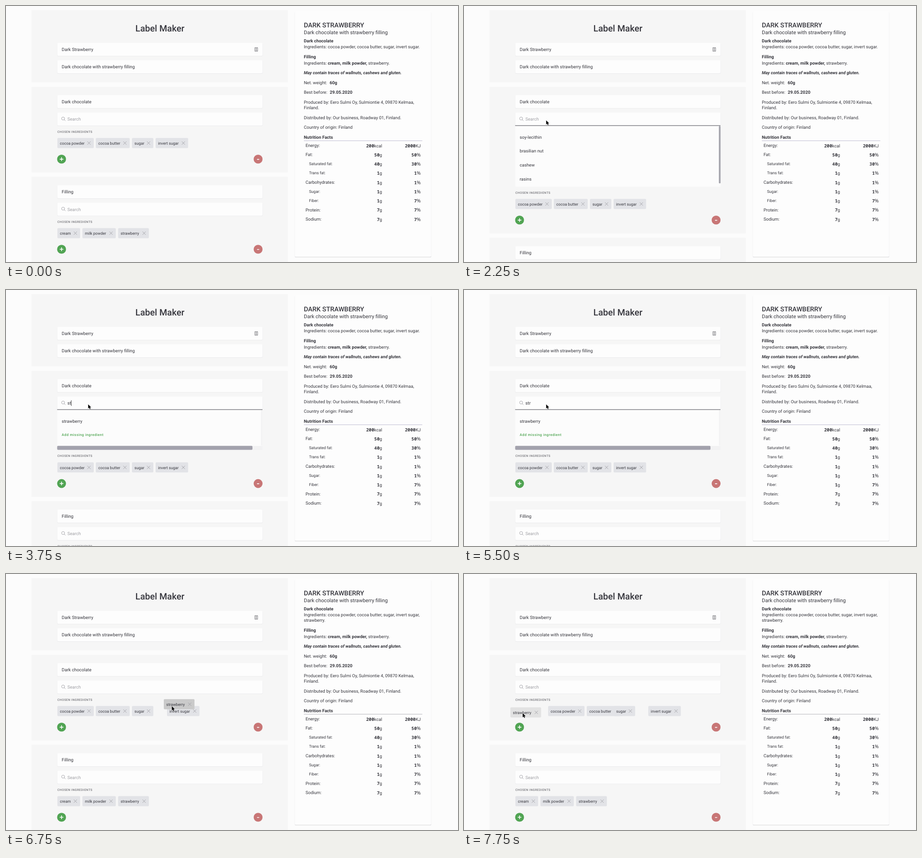
Animation, 994 px wide and 563 px high, one loop 8 s. Source, as an HTML page:

```html
<!DOCTYPE html>
<html lang="en">
<head>
<meta charset="utf-8">
<title>Label Maker</title>
<style>
  html, body { margin: 0; width: 100%; height: 100%; overflow: hidden; background: #fcfcfc; }
  svg { display: block; width: 100%; height: 100%; }
  text { font: 9.65px Roboto, sans-serif; fill: #36363d; text-rendering: geometricPrecision; }
  text.bold, .bold { font-weight: 600; }
  text.field { font-size: 9.8px; }
  text.chip { font-size: 8.6px; }
  text.hint { fill: #a0a0a5; }
  text.caps { font-size: 6.5px; font-weight: 500; letter-spacing: .52px; fill: #707075; }
  text.add { font-size: 7.8px; font-weight: 500; letter-spacing: .52px; fill: #4fa552; }
  text.title { font-size: 19.6px; font-weight: 500; text-anchor: middle; }
  text.product { font-size: 14.4px; font-weight: 500; }
  text.subtitle { font-size: 11.25px; }
  text.warning { font-size: 9.45px; font-weight: 600; font-style: italic; }
  text.sub { font-size: 8.6px; }
  text.value { text-anchor: end; }
  .digits { font: bold 9.8px "Noto Sans Mono", monospace; }
  .percent { font: 10.5px "Noto Sans", sans-serif; }
  .icon { fill: none; stroke: #9c9ca2; stroke-width: .9; }
</style>
</head>
<body>
<svg id="stage" viewBox="0 0 994 563"></svg>
<script>
const STEP = 250, LOOP = 8000;
const stage = document.getElementById('stage');

// Keys are [tick, ...values]
const POINTER = [[1, 820, 318], [2, 560, 1], [3, 395, 115], [4, 308, 240], [5, 162, 247],
  [6, 162, 247], [9, 180.7, 251.5], [24, 180.7, 251.5], [26, 423, 306], [29, 248, 260.5], [31, 129, 306]];
const DRAGGED = [[26, 405.5, 290.3], [29, 230, 245.3], [31, 102, 293.3]];
const CHOSEN = [
  { label: 'cocoa powder', x: 113, width: 80, shift: [[28, 0], [29, 52], [31, 72]] },
  { label: 'cocoa butter', x: 197.5, width: 74.5, shift: [[28, 0], [29, 52], [31, 72.5]] },
  { label: 'sugar', x: 277, width: 47, shift: [[27, 0], [29, 37.5], [31, 52.3]] },
  { label: 'invert sugar', x: 329, width: 71.5, shift: [[26, 0], [28, 50], [29, 55], [31, 76.3]] },
];
const NUTRITION = [
  ['Energy:', 200, 'kcal', 2000, 'KJ'], ['Fat:', 50, 'g', 50, '%'],
  ['Saturated fat:', 40, 'g', 30, '%', true], ['Trans fat:', 1, 'g', 1, '%', true],
  ['Carbohydrates:', 1, 'g', 1, '%'], ['Sugar:', 1, 'g', 1, '%', true],
  ['Fiber:', 1, 'g', 7, '%', true], ['Protein:', 7, 'g', 7, '%'], ['Sodium:', 7, 'g', 7, '%'],
];

function at(keys, tick) {
  const next = keys.findIndex(key => key[0] > tick);
  if (next < 0) return keys[keys.length - 1].slice(1);
  if (next === 0) return keys[0].slice(1);
  const a = keys[next - 1], b = keys[next], p = (tick - a[0]) / (b[0] - a[0]);
  return a.slice(1).map((v, i) => v + (b[i + 1] - v) * p);
}

const rect = (x, y, w, h, fill, r = 0) =>
  `<rect x="${x}" y="${y}" width="${w}" height="${h}" rx="${r}" fill="${fill}"/>`;
const text = (x, y, content, cls = '') => `<text x="${x}" y="${y}" class="${cls}">${content}</text>`;
const path = (d, attrs) => `<path d="${d}" ${attrs}/>`;
const group = (x, y, content) => `<g transform="translate(${x} ${y})">${content}</g>`;
const card = (y, h) => rect(56, y, 564, h, '#f6f6f6', 1);

const field = (y, content = '', cls = 'field') =>
  rect(112.5, y + .8, 452, 29, '#ebebed', 2) + rect(113, y, 451, 28.8, '#fdfdfd', 2) +
  text(122.5, y + 18, content, cls);

const searchField = (y, typed = '') => field(y) +
  `<circle class="icon" cx="125.6" cy="${y + 13.2}" r="3.3"/>` +
  path(`M128 ${y + 15.6}l2.8 2.8`, 'class="icon"') +
  text(135, y + 18, typed || 'Search', typed ? 'field' : 'hint');

const chip = (x, y, width, label, fill = '#e2e3e7') => group(x, y,
  rect(0, 0, width, 22.2, fill, 2) + text(5.5, 14.6, label, 'chip') +
  path(`M${width - 14} 7.6l7 7m0 -7l-7 7`, 'class="icon"'));

const buttons = y =>
  `<circle cx="122.2" cy="${y}" r="9.8" fill="#51a453"/><circle cx="554.4" cy="${y}" r="9.8" fill="#c87676"/>` +
  path(`M118.2 ${y}h8m-4 -4v8M552 ${y + .5}h4.8`, 'stroke="#fff" stroke-width="1.7"');

function dropdown(query) {
  const options = query.length > 1 ? ['strawberry'] : ['soy-lecithin', 'brasilian nut', 'cashew', 'rasins'];
  const short = options.length === 1;
  const bars = short
    ? rect(560.5, 264, 3.5, 78, '#f3f3f4') + rect(113, 342.8, 451, 9, '#f2f2f3') +
      rect(112.5, 342.8, 429.5, 8.8, '#a3a2ad', 2) + text(122.5, 321.2, 'Add missing ingredient', 'add')
    : rect(560.5, 264, 3.7, 126, '#a5a5ad', 1.5);
  return rect(113, 263, 451, short ? 80 : 134.5, '#fcfcfc') +
    options.map((name, i) => text(122.5, 291.7 + i * 30.6, name)).join('') +
    bars + rect(112.5, 262.3, 451.5, 1.4, '#77777c');
}

function firstComponent(tick, open, query, push) {
  const added = tick >= 24;
  let svg = card(178, 188.3 + push) + field(196, 'Dark chocolate') + searchField(234.3, query);
  if (open) {
    svg += dropdown(query);
    // Caret blinks every half second after focus
    if (tick >= 14 ? tick < 16 || tick % 4 < 2 : tick % 4 > 1)
      svg += rect([135, 140, 143, 146.2][query.length], 242.5, .9, 12.5, '#333');
  }
  svg += text(113, 278.5 + push, 'CHOSEN INGREDIENTS', 'caps');
  for (const { label, x, width, shift } of CHOSEN)
    svg += chip(x + at(shift, tick)[0], 290.3 + push, width, label);
  if (added) {
    const [x, y] = at(DRAGGED, tick);
    svg += chip(x, y, 67.5, 'strawberry', tick < 30 ? '#cacaca' : '#e2e2e2');
  }
  return svg + buttons(336.8 + push);
}

const secondComponent = push => group(0, push,
  card(375.5, 200) + field(394.2, 'Filling') + searchField(432.5) +
  text(113, 476.8, 'CHOSEN INGREDIENTS', 'caps') +
  chip(113, 488.5, 50, 'cream') + chip(168, 488.5, 73.5, 'milk powder') +
  chip(246.5, 488.5, 67.7, 'strawberry') + buttons(535));

const header = card(8.7, 159.3) + text(338.5, 56, 'Label Maker', 'title') +
  field(81, 'Dark Strawberry') + field(119.3, 'Dark chocolate with strawberry filling') +
  path('M547.3 91.5h6v8h-6zM549 93.5h2.6M550.3 93.5v4M549 97.5h2.6',
    'fill="none" stroke="#66666b" stroke-width=".9"');

const value = (x, y, number, unit) => text(x, y,
  `<tspan class="digits">${number}</tspan><tspan class="${unit === '%' ? 'percent' : ''}">${unit}</tspan>`, 'value');

function label(added) {
  const line = (y, content, cls) => text(655, y, content, cls);
  const bold = content => `<tspan class="bold">${content}</tspan>`;
  const rows = NUTRITION.map(([name, amount, unit, share, shareUnit, sub], i) => {
    const y = 310 + i * 20.25;
    return text(sub ? 666.5 : 658.7, y - (sub ? .3 : 0), name, sub ? 'sub' : '') +
      value(827, y + .5, amount, unit) + value(912, y + .5, share, shareUnit);
  });
  return rect(634.5, 13, 301, 540, '#f3f3f4', 3) + rect(635.5, 550, 299.5, 2.8, '#dfdfe1', 2) +
    rect(635.5, 12, 299, 539.6, '#fdfdfd', 2) +
    line(46.8, 'DARK STRAWBERRY', 'product') +
    line(62.4, 'Dark chocolate with strawberry filling', 'subtitle') +
    line(79.8, 'Dark chocolate', 'bold') +
    line(93.4, 'Ingredients: cocoa powder, cocoa butter, sugar, invert sugar' + (added ? ',' : '.')) +
    (added ? line(105.4, 'strawberry.') : '') +
    group(0, added ? 12 : 0,
      line(115.2, 'Filling', 'bold') +
      line(128.8, `Ingredients: ${bold('cream, milk powder,')} strawberry.`) +
      line(150.3, 'May contain traces of wallnuts, cashews and gluten.', 'warning') +
      line(172, 'Net. weight:') + text(711.7, 172, '60g', 'bold') +
      line(193.4, 'Best before:') + text(711.9, 193.4, '29.05.2020', 'bold') +
      line(215, 'Produced by: Eero Sulmi Oy, Sulmiontie 4, 09870 Kelmaa,') +
      line(227.2, 'Finland.') +
      line(248.7, 'Distributed by: Our business, Roadway 01, Finland.') +
      line(270.2, 'Country of origin: Finland') +
      line(291.8, 'Nutrition Facts', 'bold') +
      rect(655, 295.8, 260.5, 1, added ? '#b4b4bb' : '#bdbbd0') + rows.join(''));
}

function pointer(tick) {
  if (tick < 1) return '';
  const [x, y] = at(POINTER, tick);
  return group(x, y, path('M0 0V9.2L2.1 7.3L3.6 10.6L5.2 9.9L3.8 6.7H6.6Z',
    'fill="#000" stroke="#fff" stroke-width=".8" paint-order="stroke"'));
}

function render(tick) {
  const open = tick >= 6 && tick < 24;
  const query = open ? 'str'.slice(0, Math.max(0, tick - 13)) : '';
  const push = !open ? 0 : query.length > 1 ? 88.8 : 134;
  stage.innerHTML = header + secondComponent(push) + firstComponent(tick, open, query, push) +
    label(tick >= 24) + pointer(tick);
}

let shown = -1;
function frame() {
  const tick = Math.floor(performance.now() % LOOP / STEP);
  if (tick !== shown) render(shown = tick);
  requestAnimationFrame(frame);
}
frame();
</script>
</body>
</html>
```
